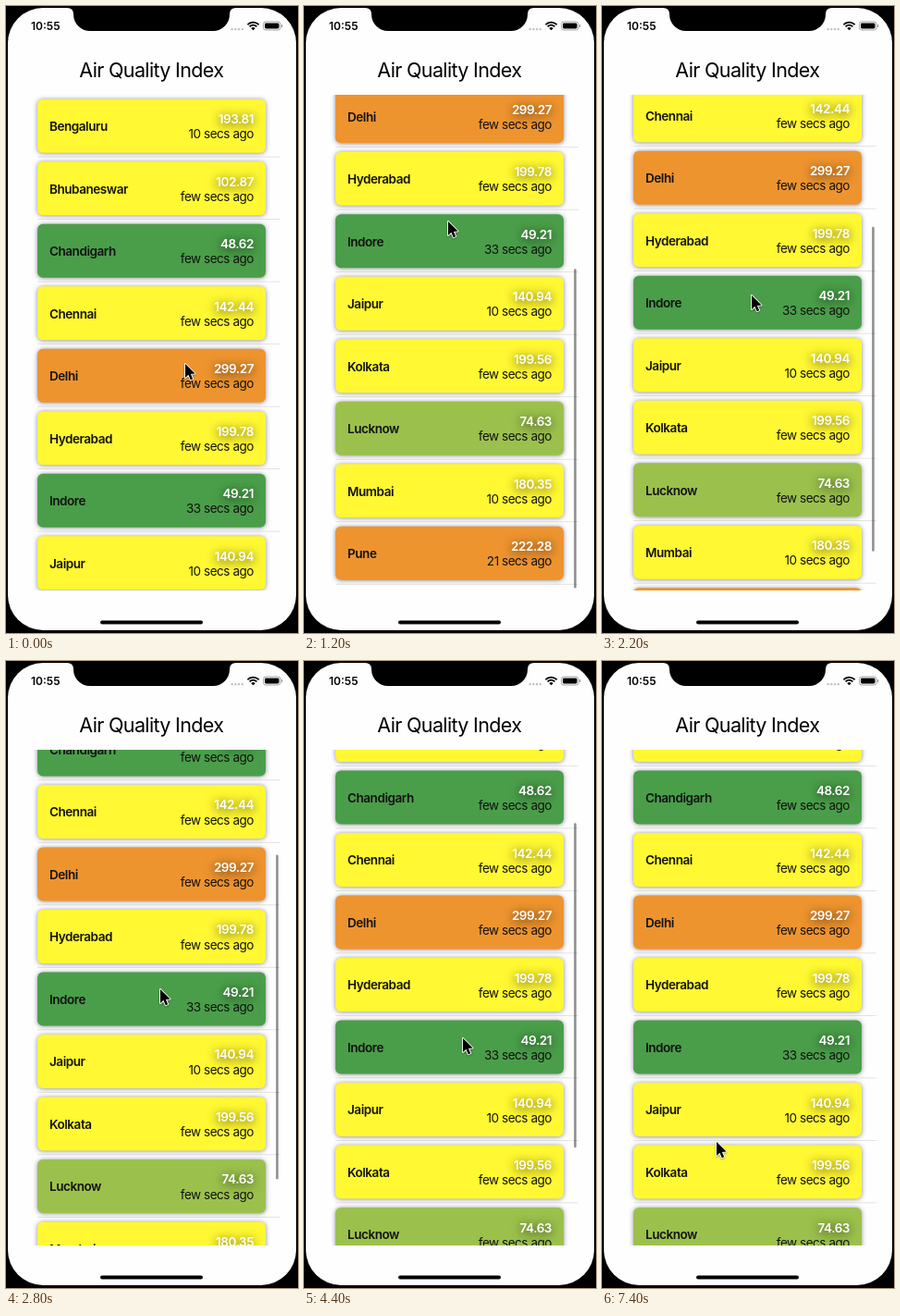
Recreate the animation shown at these times as an HTML page with a canvas. Size 316 px wide and 678 px high, loop 8000 ms.

```html
<!DOCTYPE html>
<html lang="en">
<head>
<meta charset="utf-8">
<title>Air Quality Index</title>
<style>
  html, body { margin: 0; width: 100%; height: 100%; overflow: hidden; background: #000; }
  canvas { display: block; width: 316px; height: 678px; }
</style>
</head>
<body>
<canvas id="stage" width="316" height="678"></canvas>
<script>
const ctx = document.getElementById('stage').getContext('2d');
const LOOP = 8000, STEP = 200;
const FONT = 'Inter, "Open Sans", sans-serif';
const LIST = { top: 96, bottom: 632, row: 67.5 };
const YELLOW = '#fff832', GREEN = '#4a9e49', ORANGE = '#ee942f', LIME = '#9bc14c';

const cities = [
  ['Bengaluru', 193.81, '10'], ['Bhubaneswar', 102.87, 'few'],
  ['Chandigarh', 48.62, 'few'], ['Chennai', 142.44, 'few'],
  ['Delhi', 299.27, 'few'], ['Hyderabad', 199.78, 'few'],
  ['Indore', 49.21, '33'], ['Jaipur', 140.94, '10'],
  ['Kolkata', 199.56, 'few'], ['Lucknow', 74.63, 'few'],
  ['Mumbai', 180.35, '10'], ['Pune', 222.28, '21']
];
const maxScroll = cities.length * LIST.row - (LIST.bottom - LIST.top);

// Keys are [time, value, ...]
const scrollKeys = [[0, 0], [200, 28], [400, 125], [600, 215], [800, 262], [1000, 279],
  [1200, 280.4], [1400, 272], [2200, 214], [2800, 169.3], [3600, 141.2], [4400, 117.2]];
const cursorKeys = [[0, 194, 387], [200, 190, 368], [400, 176, 300], [600, 163, 250],
  [800, 158, 237], [1200, 156, 233], [2200, 162, 313], [2800, 167, 355], [3600, 170, 384],
  [4400, 172, 408], [4800, 172, 408], [5800, 202, 243], [6000, 203, 241], [6400, 202, 243],
  [7400, 124, 520]];
const barKeys = [[0, 0], [200, 1], [4400, 1], [4800, 0]];

function sample(keys, t) {
  const next = keys.findIndex(k => k[0] > t);
  if (next < 0) return keys[keys.length - 1].slice(1);
  const a = keys[next - 1], b = keys[next];
  const u = (t - a[0]) / (b[0] - a[0]);
  return a.slice(1).map((v, i) => v + (b[i + 1] - v) * u);
}

function shadow(color, blur, dy = 0) {
  ctx.shadowColor = color;
  ctx.shadowBlur = blur;
  ctx.shadowOffsetY = dy;
}

function box(x, y, w, h, r, fill) {
  ctx.beginPath();
  ctx.roundRect(x, y, w, h, r);
  ctx.fillStyle = fill;
  ctx.fill();
}

function text(str, x, y, { size = 13.5, weight = 400, align = 'left', color = '#000', spacing = -0.45 } = {}) {
  ctx.font = `${weight} ${size}px ${FONT}`;
  ctx.letterSpacing = spacing + 'px';
  ctx.textAlign = align;
  ctx.fillStyle = color;
  ctx.fillText(str, x, y);
}

function cardColor(value) {
  return value <= 50 ? GREEN : value <= 100 ? LIME : value <= 200 ? YELLOW : ORANGE;
}

function drawRow([name, value, age], y) {
  ctx.fillStyle = '#dcdcde';
  ctx.fillRect(34, y + LIST.row - 0.8, 263, 0.8);
  ctx.save();
  shadow('rgba(40,40,60,.55)', 5, 0.5);
  box(34, y + 4.7, 247, 58, 6, cardColor(value));
  ctx.restore();
  text(name, 47, y + 39, { weight: 600, color: '#111' });
  ctx.save();
  shadow('rgba(0,0,0,.8)', 11, 2);
  text(value.toFixed(2), 268, y + 31.2, { weight: 600, align: 'right', color: '#fff' });
  ctx.restore();
  text(`${age} secs ago`, 268, y + 47.3, { align: 'right', color: '#111' });
}

function drawList(scroll) {
  ctx.save();
  ctx.beginPath();
  ctx.rect(28, LIST.top, 270, LIST.bottom - LIST.top);
  ctx.clip();
  cities.forEach((city, i) => {
    const y = LIST.top + i * LIST.row - scroll;
    if (y > LIST.top - LIST.row && y < LIST.bottom) drawRow(city, y);
  });
  ctx.restore();
}

function drawScrollBar(scroll, alpha) {
  if (!alpha) return;
  const over = Math.max(0, scroll - maxScroll);
  const top = 98.5 + Math.min(scroll, maxScroll) * 0.655 + over;
  const bottom = Math.min(629.5, top + 351);
  box(292.2, top, 2.5, bottom - top, 1.25, `rgba(0,0,0,${0.45 * alpha})`);
}

function drawPhone() {
  ctx.fillStyle = '#000';
  ctx.fillRect(0, 0, 316, 678);
  box(2, 2, 312, 673, 38, '#fefefe');
  // notch
  ctx.beginPath();
  ctx.moveTo(66, 0);
  ctx.lineTo(66, 2);
  ctx.quadraticCurveTo(73, 2, 73, 9);
  ctx.arcTo(73, 27, 92, 27, 18);
  ctx.arcTo(242, 27, 242, 9, 18);
  ctx.lineTo(242, 9);
  ctx.quadraticCurveTo(242, 2, 249, 2);
  ctx.lineTo(249, 0);
  ctx.fillStyle = '#000';
  ctx.fill();
}

function drawStatus() {
  text('10:55', 27, 26, { size: 12, weight: 600, spacing: 0 });
  for (let i = 0; i < 4; i++) box(243.5 + i * 3.7, 24, 2.3, 2.3, 1.1, '#bbb');
  // wifi
  ctx.strokeStyle = '#000';
  ctx.lineWidth = 1.8;
  for (const r of [8.4, 5.3]) {
    ctx.beginPath();
    ctx.arc(267.5, 26, r, -Math.PI * 0.76, -Math.PI * 0.24);
    ctx.stroke();
  }
  ctx.beginPath();
  ctx.moveTo(267.5, 26.3);
  ctx.arc(267.5, 26.3, 3.2, -Math.PI * 0.76, -Math.PI * 0.24);
  ctx.fillStyle = '#000';
  ctx.fill();
  // battery
  ctx.beginPath();
  ctx.roundRect(278.5, 17, 18.5, 9, 2.6);
  ctx.strokeStyle = '#999';
  ctx.lineWidth = 0.9;
  ctx.stroke();
  box(280, 18.5, 15.5, 6, 1.4, '#000');
  box(298, 20, 1.2, 3, 0.6, '#999');
}

function drawCursor(x, y) {
  ctx.save();
  ctx.translate(x, y);
  ctx.beginPath();
  [[0, 0], [0, 15], [3.4, 11.8], [5.7, 17.2], [8.2, 16.2], [5.9, 10.9], [10.6, 10.6]]
    .forEach(p => ctx.lineTo(...p));
  ctx.closePath();
  ctx.lineJoin = 'round';
  ctx.lineWidth = 1.8;
  ctx.strokeStyle = '#fff';
  shadow('rgba(0,0,0,.35)', 2, 1);
  ctx.stroke();
  shadow('transparent', 0);
  ctx.fillStyle = '#000';
  ctx.fill();
  ctx.restore();
}

function draw(now) {
  const t = Math.floor((now % LOOP) / STEP) * STEP;
  const [scroll] = sample(scrollKeys, t);
  drawPhone();
  drawStatus();
  text('Air Quality Index', 157.3, 77, { size: 21.5, align: 'center', spacing: -0.65 });
  drawList(scroll);
  drawScrollBar(scroll, sample(barKeys, t)[0]);
  box(102, 664.5, 111, 4, 2, '#000');
  drawCursor(...sample(cursorKeys, t));
}

const start = performance.now();
function tick() {
  draw(performance.now() - start);
  requestAnimationFrame(tick);
}
tick();
</script>
</body>
</html>
```
